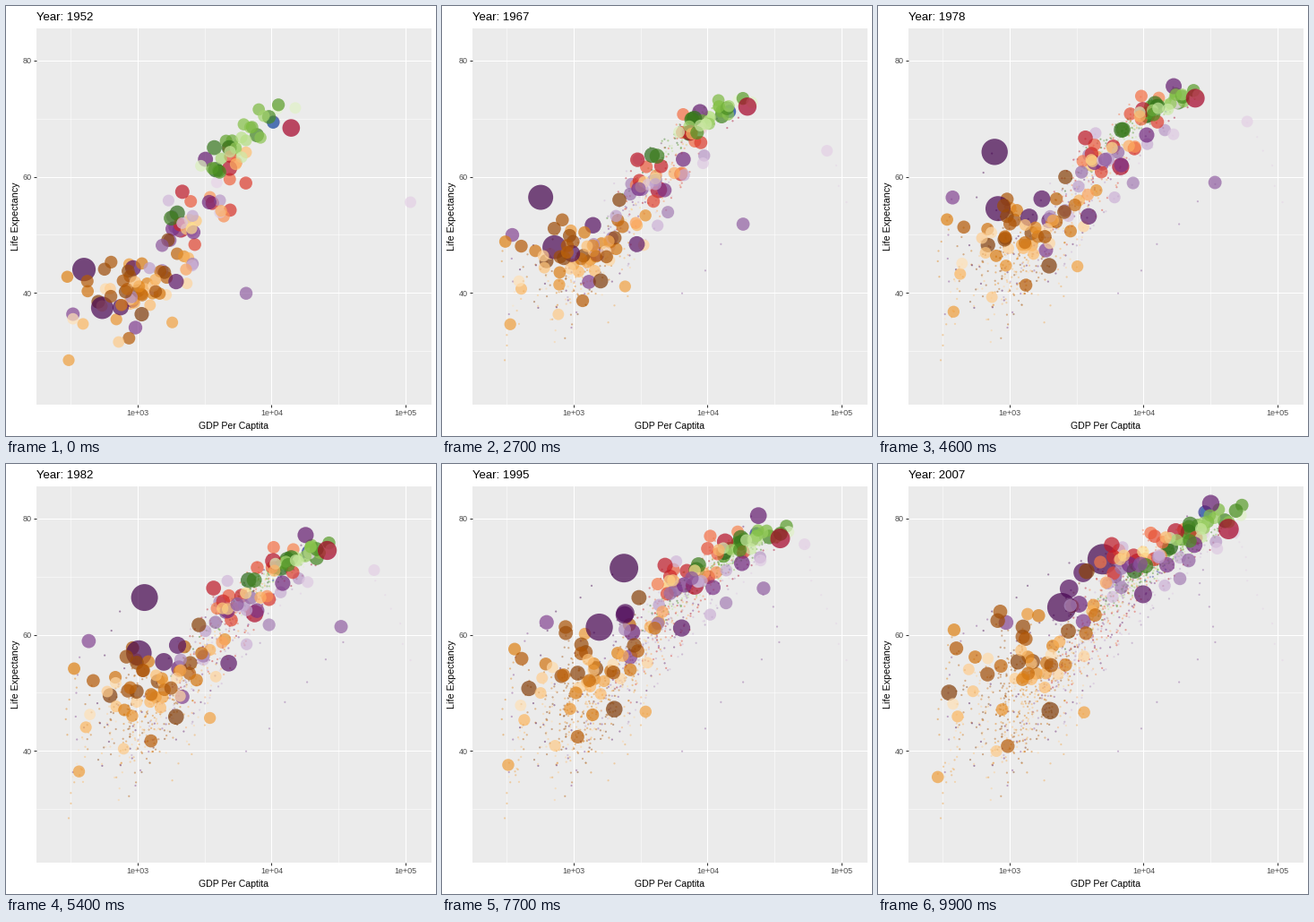
A matplotlib script that plays this animation: 480x480 px, repeating every 10 s.

```python
import matplotlib.pyplot as plt
import numpy as np
from matplotlib.animation import FuncAnimation
from matplotlib.colors import LinearSegmentedColormap

FRAMES, SPAN = 100, 55
KEYS = (0, 25, 55)                    # years since 1952 that anchor each path
KNOTS = np.arange(0, SPAN + 1, 5)     # years with a data point
rng = np.random.default_rng(11)
plt.rcParams["font.family"] = ["Liberation Sans", "DejaVu Sans"]

# Per region: country count, palette from most to least populous,
# population (ranks -> millions), growth, link between wealth and life,
# and (mean log GDP, sd, mean life, sd) at each key year
REGIONS = {
    "oceania": (2, "#313695 #4575b4", (1, 2), (20, 4), 2.2, .8,
                [(4.01, .01, 69.2, .2), (4.24, .03, 73, .5), (4.46, .07, 80.7, .5)]),
    "africa": (52, "#7f3b08 #b35806 #e08214 #fdb863 #fee0b6",
               (1, 2, 10, 25, 52), (135, 80, 33, 10, .2), 3.8, .45,
               [(2.95, .24, 39.5, 4.5), (3.09, .27, 49, 5), (3.1, .33, 54, 7.5)]),
    "americas": (25, "#a50026 #d73027 #f46d43 #fdae61 #fee090",
                 (1, 2, 5, 10, 25), (301, 190, 40, 14, 1), 2.1, .8,
                 [(3.44, .2, 53, 7), (3.72, .19, 64.5, 5), (3.86, .24, 73.3, 3)]),
    "asia": (33, "#40004b #762a83 #9970ab #c2a5cf #e7d4e8",
             (1, 2, 3, 10, 33), (1319, 1110, 224, 65, .7), 2.5, .8,
             [(3.17, .27, 47, 8), (3.56, .34, 59.5, 7), (3.83, .42, 70.3, 5)]),
    "europe": (30, "#276419 #4d9221 #7fbc41 #b8e186 #e6f5d0",
               (1, 5, 10, 30), (82, 58, 11, .3), 1.3, .9,
               [(3.72, .22, 65, 4.5), (4.13, .16, 72, 1.7), (4.38, .22, 77.8, 2.6)]),
}
# Countries the eye follows: GDP and life at the key years
LEADERS = {
    ("asia", 1): ((400, 741, 4959), (44, 64, 73)),
    ("asia", 2): ((547, 800, 2452), (37.4, 54.2, 64.7)),
    ("asia", 3): ((750, 1383, 3541), (37.5, 52.7, 70.7)),
    ("asia", 6): ((3217, 16610, 31656), (63, 75.4, 82.6)),
    ("asia", 12): ((331, 371, 944), (36.3, 56.1, 62.1)),
    ("asia", 15): ((6460, 34168, 21655), (39.9, 58.7, 72.8)),
    ("asia", 32): ((108382, 59265, 47307), (55.6, 69.3, 77.6)),
    ("africa", 1): ((1077, 1982, 2014), (36.3, 44.5, 46.9)),
    ("americas", 1): ((13990, 24073, 42952), (68.4, 73.4, 78.2)),
    ("americas", 2): ((2109, 6660, 9066), (50.9, 61.5, 72.4)),
}
# Short-lived losses of life expectancy: year, width, depth
SHOCKS = {("asia", 1): (10, 3, 8.5), ("africa", 24): (40, 4.5, 22.5)}


def anchors(link, spread):
    """Log GDP and life at the key years; richer countries live longer."""
    wealth, health = rng.normal(size=2).clip(-1.8, 1.8)
    gdp, life = [], []
    for mx, sx, my, sy in spread:
        w = wealth + rng.normal(0, .2)
        h = link * w + np.sqrt(1 - link ** 2) * health
        gdp.append(mx + sx * w)
        life.append(my + sy * h)
    return gdp, life


def path(key, link, spread):
    """Data points at the knots: straight GDP, curved life, slight wobble."""
    gdp, life = anchors(link, spread)
    if key in LEADERS:
        gdp, life = np.log10(LEADERS[key][0]), LEADERS[key][1]
    wobble = rng.normal(size=(2, len(KNOTS))) * ~np.isin(KNOTS, KEYS)
    x = np.interp(KNOTS, KEYS, gdp) + .02 * wobble[0]
    y = np.polyval(np.polyfit(KEYS, life, 2), KNOTS) + .3 * wobble[1]
    if key in SHOCKS:
        mid, width, depth = SHOCKS[key]
        y -= depth * np.exp(-((KNOTS - mid) / width) ** 2)
    return np.column_stack([x, y])


def area(pop):
    """Marker size in square points for a population in millions."""
    return (12.6 + 21.4 * np.sqrt(pop / 1319)) ** 2


def build():
    pts, sizes, colors = [], [], []
    for name, (n, palette, ranks, pops, growth, link, spread) in REGIONS.items():
        cmap = LinearSegmentedColormap.from_list(name, palette.split())
        for rank in range(1, n + 1):
            pts.append(path((name, rank), link, spread))
            pop = np.exp(np.interp(rank, ranks, np.log(pops)))
            sizes.append(area(pop * growth ** (KNOTS / SPAN - 1)))
            colors.append(cmap((rank - 1) / (n - 1)))
    # Mixed stacking, with the first region kept at the back
    back = REGIONS["oceania"][0]
    order = np.r_[:back, back + rng.permutation(len(pts) - back)]
    return [np.array(a)[order] for a in (pts, sizes, colors)]


points, sizes, colors = build()

fig = plt.figure(figsize=(480 / 72, 480 / 72), dpi=72, facecolor="white")
ax = fig.add_axes([34 / 480, 34.6 / 480, 440.6 / 480, 420.4 / 480],
                  facecolor="#ebebeb")
ax.set(xlim=(2.248, 5.189), ylim=(20.65, 85.55))
ax.set_xticks([3, 4, 5], ["1e+03", "1e+04", "1e+05"])
ax.set_xticks([2.5, 3.5, 4.5], minor=True)
ax.set_yticks([40, 60, 80])
ax.set_yticks([30, 50, 70], minor=True)
ax.grid(which="major", color="white", lw=1.07)
ax.grid(which="minor", color="white", lw=.53)
ax.set_axisbelow(True)
ax.tick_params(which="major", length=2.7, width=1.07, pad=2.2, color="#333333",
               labelsize=9, labelcolor="#4d4d4d")
ax.tick_params(which="minor", length=0)
for spine in ax.spines.values():
    spine.set_visible(False)

fig.text(254.3 / 480, 8 / 480, "GDP Per Captita", size=10.5, ha="center")
fig.text(11.5 / 480, 245 / 480, "Life Expectancy", size=10.8, rotation=90,
         ha="center", va="center")
title = fig.text(34 / 480, 464 / 480, "", size=13.2)

trail = ax.scatter([], [], s=4.8, lw=0, alpha=.43, zorder=2)
bubbles = ax.scatter(points[:, 0, 0], points[:, 0, 1], s=sizes[:, 0], c=colors,
                     lw=0, alpha=.7, zorder=3)


def draw(i):
    t = SPAN * i / (FRAMES - 1)
    k = min(i // 9, len(KNOTS) - 2)
    f = i / 9 - k
    bubbles.set_offsets(points[:, k] * (1 - f) + points[:, k + 1] * f)
    bubbles.set_sizes(sizes[:, k] * (1 - f) + sizes[:, k + 1] * f)

    past = int(np.sum(KNOTS < t - 1e-9))
    trail.set_offsets(points[:, :past].reshape(-1, 2))
    trail.set_facecolor(np.repeat(colors, past, axis=0))
    title.set_text(f"Year: {1952 + round(t)}")
    return bubbles, trail, title


anim = FuncAnimation(fig, draw, frames=FRAMES, interval=100, repeat=True,
                     repeat_delay=0, blit=False)
plt.show()
```
